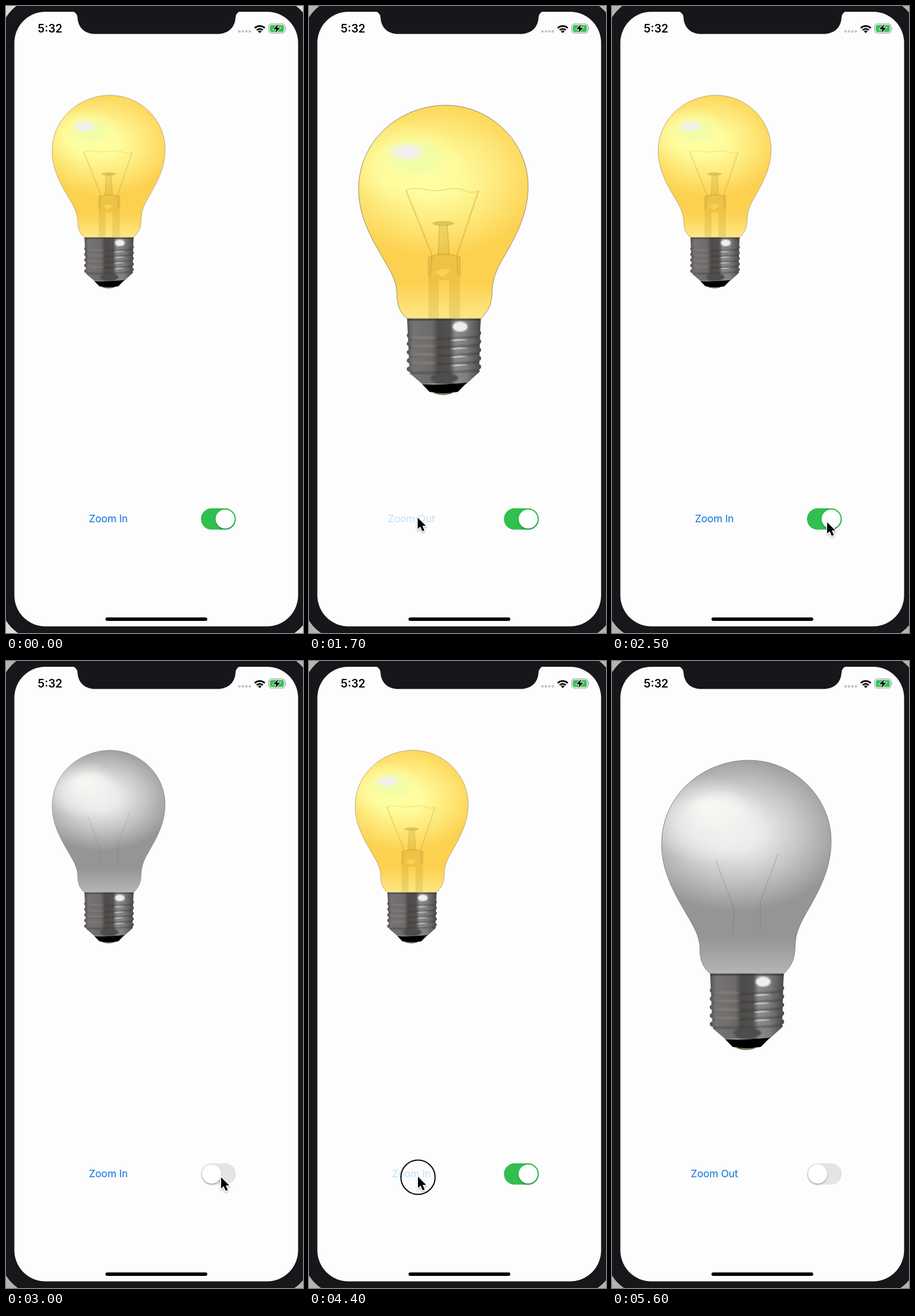
These frames come from a looping animation (515 by 1087 pixels, 5700 ms). An HTML page:

```html
<!DOCTYPE html>
<html lang="en">
<head>
<meta charset="utf-8">
<title>Light bulb</title>
<style>
html, body { margin: 0; width: 100%; height: 100%; overflow: hidden; }
svg { display: block; font-family: Inter, "Liberation Sans", sans-serif; }
</style>
</head>
<body>
<svg width="515" height="1087" viewBox="0 0 515 1087">
  <defs>
    <linearGradient id="metal" gradientUnits="userSpaceOnUse" x1="170" x2="298" y1="0" y2="0">
      <stop offset="0" stop-color="#555355"/>
      <stop offset=".08" stop-color="#757375"/>
      <stop offset=".34" stop-color="#6c6a6b"/>
      <stop offset=".42" stop-color="#4d4c4a"/>
      <stop offset=".58" stop-color="#525150"/>
      <stop offset=".66" stop-color="#8c8b8b"/>
      <stop offset=".8" stop-color="#807f80"/>
      <stop offset=".9" stop-color="#656365"/>
      <stop offset="1" stop-color="#4a494a"/>
    </linearGradient>
    <filter id="soft" x="-30%" y="-60%" width="160%" height="220%"><feGaussianBlur stdDeviation="1.6"/></filter>
    <filter id="shadow" x="-40%" y="-40%" width="180%" height="190%">
      <feDropShadow dx="0" dy="2" stdDeviation="1.6" flood-opacity=".3"/>
    </filter>
    <path id="glass" d="M238 172C318 173 380 238 380 312C380 352 366 385 347 419C334 443 320 462 318 488C317 512 316 524 298 542H170C157 530 153 519 152.5 502C153 476 140 458 124 430C101 391 86 356 86 318C86 232 158 172 238 172Z"/>
  </defs>

  <rect id="desk" width="515" height="1087"/>
  <rect x="-10" y="-14" width="541" height="1113" rx="70" fill="#18161a"/>
  <rect x="14.5" y="10" width="492" height="1065.5" rx="54" fill="#fefdfe"/>
  <path fill="#18161a" d="M113 9Q123 10 124 20C125 38 137 48.5 155 48.5H366C385 48.5 397 38 398 20Q399 10 408 9Z"/>

  <text x="55" y="46" font-size="19.5" font-weight="600">5:32</text>
  <path d="M404.8 44H426" stroke="#c6c6c9" stroke-width="4.6" stroke-linecap="round" stroke-dasharray="0 6"/>
  <g fill="none" stroke="#000" stroke-width="2.8">
    <path d="M431.3 38.3A12.4 12.4 0 0 1 448.7 38.3"/>
    <path d="M434.7 41.8A7.6 7.6 0 0 1 445.3 41.8"/>
  </g>
  <path d="M436.8 43.8A4.5 4.5 0 0 1 443.2 43.8L440 47Z"/>
  <rect x="455.7" y="31.2" width="28" height="15.6" rx="4.4" fill="none" stroke="#9c9c9e" stroke-width="1.2"/>
  <rect x="457.6" y="33.1" width="24.2" height="11.8" rx="2.7" fill="#31c452"/>
  <path d="M485 36.5Q487.2 39 485 41.5Z" fill="#9c9c9e"/>
  <path d="M472 31.5L463.5 40.3H468.7L467 46.8L475.6 37.7H470.3Z" stroke="#fff" stroke-width="1.7" paint-order="stroke"/>

  <g id="bulb"></g>

  <text id="label" x="177.5" y="895" font-size="17.8" letter-spacing="-.15" text-anchor="middle"></text>
  <rect id="track" x="338" y="870.8" width="60.5" height="37" rx="18.5"/>
  <circle id="knob" cy="889.3" r="16.4" fill="#fff" filter="url(#shadow)"/>
  <rect x="172.5" y="1060" width="176.5" height="6" rx="3"/>

  <g id="cursor">
    <circle id="ring" r="29.7" cy="1" fill="none" stroke="#000" stroke-width="2"/>
    <path d="M0 0V19.5L4.4 15.5L8 23.6L11.6 22L8.1 14.2H14.2Z" stroke="#fff" stroke-width="2.6" paint-order="stroke" filter="url(#shadow)"/>
  </g>
</svg>
<script>
const $ = id => document.getElementById(id);
const clamp = v => Math.min(1, Math.max(0, v));
const mix = (a, b, p) => a + (b - a) * p;
const smooth = p => p * p * (3 - 2 * p);

// One glass body: edge tone, lower rim, highlight, glint centre and glint halo.
function glass(id, edge, rim, light, glint, halo, wire) {
  const spot = (name, cx, cy, r, squash, stops) =>
    `<radialGradient id="${id + name}" gradientUnits="userSpaceOnUse" r="${r}"
      gradientTransform="translate(${cx} ${cy}) scale(1 ${squash})" cx="0" cy="0">` +
    stops.map(([o, c, a]) => `<stop offset="${o}" stop-color="${c}" stop-opacity="${a}"/>`).join('') +
    '</radialGradient>';
  const layer = name => `<use href="#glass" fill="url(#${id + name})"/>`;
  return `<g id="${id}">
    <linearGradient id="${id}base" gradientUnits="userSpaceOnUse" x1="0" x2="0" y1="172" y2="542">
      <stop offset="0" stop-color="${edge}"/><stop offset=".83" stop-color="${edge}"/>
      <stop offset="1" stop-color="${rim}"/>
    </linearGradient>
    ${spot('light', 215, 296, 192, .72, [[0, light, 1], [.25, light, .92], [.6, light, .52], [1, light, 0]])}
    ${spot('side', 165, 275, 105, .72, [[0, light, 1], [.45, light, .75], [1, light, 0]])}
    ${spot('halo', 184, 262, 62, .64, [[0, halo, 1], [.5, halo, .8], [1, halo, 0]])}
    ${spot('glint', 170, 253, 36, .5, [[0, glint, 1], [.4, glint, .9], [1, glint, 0]])}
    ${['base', 'light', 'side', 'halo', 'glint'].map(layer).join('')}
    ${wire}
    <use href="#glass" fill="none" stroke="#777164" stroke-width=".8"/>
  </g>`;
}

const sides = 'M168 319L213 431L210 471M294 320L257 431L258 468';
const onWire = `<g fill="none" stroke="#a98a24" stroke-opacity=".3" stroke-width="2">
  <path d="${sides}" stroke-width="2.4"/>
  <path d="M168 319Q184 314 202 318T238 318T270 320T294 320" stroke-width="1.3"/>
  <path d="M226 380L224 432M240 380L243 432"/>
  <path d="M207 470V436Q233 425 262 435V470"/>
  <g fill="#a98a24" stroke="none" fill-opacity=".2">
    <ellipse cx="233" cy="377" rx="19" ry="4.2" fill-opacity=".4"/>
    <path d="M227 380H240L243 432H224Z"/>
    <path d="M207 470V436Q233 425 262 435V470L246 458L232 455L218 461Z"/>
    <path d="M207 472L218 461L232 470L246 458L262 472V542H243V475H225V542H207Z"/>
  </g></g>`;
const offWire = `<path d="M180 346L212 431L210 471M288 334L257 418V466" fill="none"
  stroke="#6f6d70" stroke-opacity=".35" stroke-width="1.3"/>`;

function socket() {
  let s = `<path fill="url(#metal)" d="M170 542H298L297 560L295 630L296 634L273 655H196L176 638L174 625L171 562Z"/>
    <path d="M171 544H298" stroke="#343335" stroke-width="3" opacity=".6"/>
    <ellipse cx="262" cy="556" rx="13" ry="9" fill="#efefec" filter="url(#soft)"/>`;
  for (let i = 0; i < 5; i++) {
    const y = 568 + i * 14.6;
    s += `<path d="M174 ${y + 3}Q235 ${y + 6} 294 ${y - 1}" fill="none" stroke="url(#metal)" stroke-width="9" stroke-linecap="round"/>
      <path d="M174 ${y + 9}Q235 ${y + 11} 295 ${y + 5}" fill="none" stroke="#363536" stroke-width="3" opacity=".55" filter="url(#soft)"/>`;
    if (i < 4) s += `<ellipse cx="198" cy="${y + 8}" rx="23" ry="3.4" fill="#94877d" opacity=".65" filter="url(#soft)"/>
      <ellipse cx="261" cy="${y + 13}" rx="14" ry="3.4" fill="#e4e4e1" opacity=".85" filter="url(#soft)"/>`;
  }
  return s + `<ellipse cx="235" cy="645" rx="24" ry="8.5" fill="#4e4d4b" filter="url(#soft)"/>
    <path d="M217 671H248Q233 677 217 671Z" fill="#9a8753" stroke="#444" stroke-width=".8"/>
    <path d="M196 655.5Q235 657 274 653L258 669Q233 673.5 209 669Z"/>`;
}

$('bulb').innerHTML =
  glass('lit', '#fdd150', '#fee785', '#feffa2', '#f4eef5', '#effca5', onWire) +
  glass('dark', '#969496', '#b5b4b6', '#f0f0f0', '#f6f6f3', '#f4f4f1', offWire) + socket();

const LOOP = 5700;
const clicks = [900, 1600, 2600, 3500, 4400, 5100];
const zooms = [1100, 1800, 4600];
const toggles = [2700, 3600, 5200];
// time, x, y of the pointer tip
const route = [
  [100, 245, 986], [600, 188.5, 887], [1900, 188.5, 887], [2400, 373, 895],
  [3900, 373, 895], [4300, 189, 894], [4600, 189, 894], [5000, 367, 891]
];

function pointer(t) {
  const i = route.findIndex(p => p[0] > t);
  if (i < 0) return route.at(-1).slice(1);
  const a = route[Math.max(0, i - 1)], b = route[i];
  const p = b === a ? 0 : smooth((t - a[0]) / (b[0] - a[0]));
  return [mix(a[1], b[1], p), mix(a[2], b[2], p)];
}

function draw(t) {
  const zoomed = zooms.filter(z => t >= z).length % 2 === 1;
  const flips = toggles.filter(z => t >= z);
  const on = flips.length % 2 === 0;
  const p = flips.length ? clamp((t - flips.at(-1)) / 300) : 1;
  const amount = v => on ? v : 1 - v;
  const slide = amount(1 - (1 - p) ** 3), tint = amount(p);
  const pressed = zooms.some(z => t >= z - 200 && t < z);

  $('desk').setAttribute('fill', t < 900 ? '#dcdbdc' : '#b4b3b4');
  $('bulb').setAttribute('transform', zoomed ? '' : `translate(68 120) scale(${2 / 3}) translate(-68 -120)`);
  $('lit').style.display = on ? '' : 'none';
  $('dark').style.display = on ? 'none' : '';
  $('label').textContent = zoomed ? 'Zoom Out' : 'Zoom In';
  $('label').setAttribute('fill', pressed ? '#bfe1f7' : '#0b73d9');
  $('track').setAttribute('fill',
    `rgb(${mix(228, 49, tint)},${mix(228, 191, tint)},${mix(230, 79, tint)})`);
  $('knob').setAttribute('cx', mix(356.5, 380, slide));
  $('cursor').style.display = t >= 100 && t < 5400 ? '' : 'none';
  $('cursor').setAttribute('transform', `translate(${pointer(t)})`);
  $('ring').style.display = clicks.some(c => t >= c && t < c + 100) ? '' : 'none';
}

const start = performance.now();
function tick() {
  const t = (performance.now() - start) % LOOP;
  draw(Math.floor(t / 100) * 100);
  requestAnimationFrame(tick);
}
tick();
</script>
</body>
</html>
```
